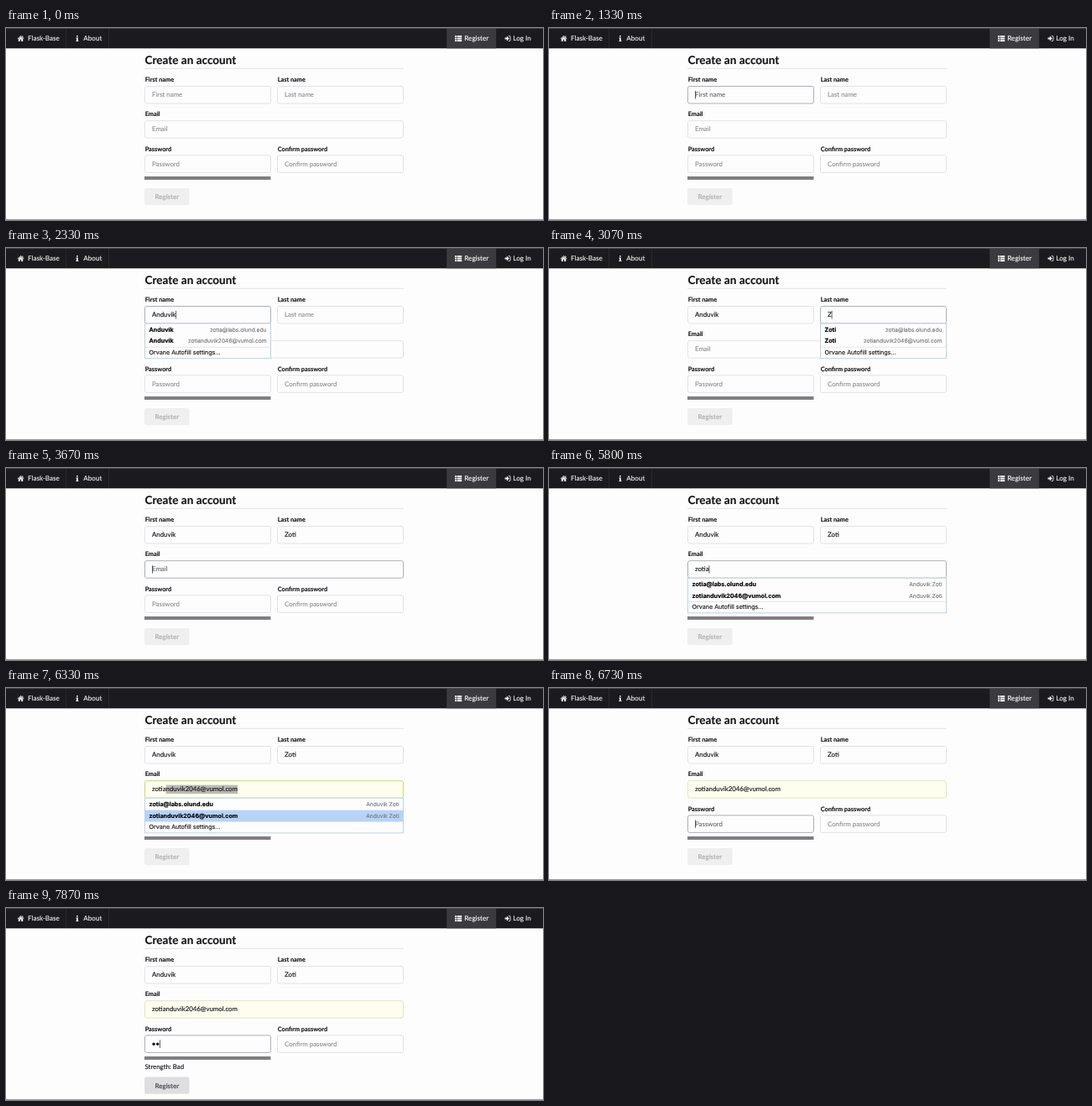
These frames come from a looping animation (640x229 px, 8 s). An HTML page:

```html
<!DOCTYPE html>
<html lang="en">
<head>
<meta charset="utf-8">
<title>Create an account</title>
<style>
  html, body { margin: 0; width: 100%; height: 100%; overflow: hidden; background: #fefdfe; }
  svg { display: block; width: 640px; height: 229px; text-rendering: geometricPrecision; }
  text { font-family: Lato, sans-serif; font-size: 7.85px; white-space: pre; stroke-width: .14; }
  .nav { font-size: 8.1px; }
  .title { font-size: 13.55px; font-weight: 700; }
  .label { font-size: 7.35px; font-weight: 700; }
  .bold { font-weight: 700; }
  .menu { font-family: Inter, sans-serif; font-size: 7.15px; }
  .hint { font-family: Inter, sans-serif; font-size: 6.65px; }
</style>
</head>
<body>
<svg id="stage" viewBox="0 0 640 229"></svg>
<script>
const LOOP = 8000;
const LEFT = 165.5, RIGHT = 323.5, HALF = 150, FULL = 308;
const FIRST = 'Anduvik', LAST = 'Zoti';
const MAILS = ['zotia@labs.olund.edu', 'zotianduvik2046@vumol.com'];
const INK = '#141416';

const stage = document.getElementById('stage');
const pen = document.createElement('canvas').getContext('2d');
pen.font = '78.5px Lato, sans-serif';
const widthOf = s => pen.measureText(s).width / 10;

// Latest value in a list of [time, value] steps.
const at = (steps, t) => steps.reduce((v, [from, next]) => t >= from ? next : v, undefined);
const within = (t, from, to) => t >= from && t < to;

const rect = (x, y, w, h, fill, more = '') =>
  `<rect x="${x}" y="${y}" width="${w}" height="${h}" fill="${fill}" ${more}/>`;
// The hairline stroke gives the slightly heavy look of smoothed screen text.
const text = (x, y, s, fill = INK, cls = '', anchor = 'start') =>
  `<text x="${x}" y="${y}" fill="${fill}" stroke="${fill}" class="${cls}" text-anchor="${anchor}">${s}</text>`;
const path = (d, fill, more = '') => `<path d="${d}" fill="${fill}" ${more}/>`;

const firstLength = [[0, 0], [1670, 1], [1800, 2], [2000, 3], [2130, 5], [2270, 6], [2330, 7]];
const lastLength = [[0, 0], [3000, 1], [3130, 2], [3270, 3], [3400, 4]];
const mailLength = [[0, 0], [5070, 1], [5200, 2], [5400, 3], [5530, 4], [5730, 5]];
const highlight = [[0, -1], [6000, 0], [6200, 1]];
const dotCount = [[0, 0], [7670, 1], [7870, 2]];
const accepted = 6470;

const fields = [
  { label: 'First name', x: LEFT, y: 69.5, w: HALF, focus: [1270, 2600],
    value: t => FIRST.slice(0, at(firstLength, t)) },
  { label: 'Last name', x: RIGHT, y: 69.5, w: HALF, focus: [2600, 3600],
    value: t => LAST.slice(0, at(lastLength, t)) },
  { label: 'Email', x: LEFT, y: 110.7, w: FULL, focus: [3600, 6670],
    value: t => at(highlight, t) < 0 ? MAILS[0].slice(0, at(mailLength, t)) : MAILS[at(highlight, t)],
    filled: t => at(highlight, t) >= 0 },
  { label: 'Password', x: LEFT, y: 151.9, w: HALF, focus: [6670, LOOP],
    dots: t => at(dotCount, t) },
  { label: 'Confirm password', x: RIGHT, y: 151.9, w: HALF, focus: [LOOP, LOOP] },
];

function drawNav() {
  const pale = '#f0f0f1', white = '#fff';
  const divider = x => rect(x, 0, 0.8, 24, '#2d2c30');
  const bullets = [9, 11.6, 14.2].map(y =>
    rect(535, y, 1.9, 1.9, white) + rect(537.6, y, 5.6, 1.9, white)).join('');
  return rect(0, 0, 640, 24.3, '#1b1a1e') + rect(525.2, 0, 59, 24.3, '#3b3a3e') +
    [71, 122].map(divider).join('') + rect(0, 0, 640, 0.8, '#504f53') +
    path('M13.5 12.7 17.5 9.1 19.3 10.7V9.5h1v2.1l1.2 1.1-.5.5-3.5-3.1-3.5 3.1zM14.8 13l2.7-2.4 2.7 2.4v2.9h-2v-2.1h-1.4v2.1h-2z', pale) +
    text(26, 15.2, 'Flask-Base', pale, 'nav') +
    path('M84 9h1.7v1.6H84zM83.4 11.4h2.4v3.6h.6v1h-3v-1h.6v-2.6h-.6z', pale) +
    text(92.3, 15.2, 'About', pale, 'nav') +
    bullets + text(546.3, 15.2, 'Register', white, 'nav') +
    path('M594.5 11.5h2.3V9.6l3 2.9-3 2.9v-1.9h-2.3z', pale) +
    path('M598.7 9.5h1.2q1.1 0 1.1 1.1v3.8q0 1.1-1.1 1.1h-1.2', 'none', `stroke="${pale}" stroke-width=".9"`) +
    text(604.3, 15.2, 'Log In', pale, 'nav');
}

function drawField(f, t) {
  const focused = within(t, ...f.focus);
  const filled = f.filled && f.filled(t);
  const value = f.value ? f.value(t) : '';
  const dots = f.dots ? f.dots(t) : 0;
  const [idle, active] = filled ? ['#e2e6c3', '#c9d973'] : ['#e2e1e4', '#a9b1b4'];
  const blend = focused ? Math.min(100, (t - f.focus[0]) / 0.8 + 40) : 0;
  const textX = f.x + 8.5, base = f.y + 12.6;

  let out = text(f.x + 0.2, f.y - 5.4, f.label, INK, 'label') +
    rect(f.x, f.y, f.w, 20.5, filled ? '#fdfeed' : '#fefdfe',
      `rx="2.2" stroke="color-mix(in srgb, ${active} ${blend}%, ${idle})"`);

  const selecting = filled && t < accepted;
  if (selecting) {
    const typed = widthOf(MAILS[0].slice(0, 5));
    out += rect(textX + typed, f.y + 5, widthOf(value) - typed, 10.5, '#b9bab4');
  }
  for (let i = 0; i < dots; i++)
    out += `<circle cx="${textX + 2.1 + 4.6 * i}" cy="${f.y + 10.4}" r="1.7" fill="${INK}"/>`;
  if (value) out += text(textX, base, value);
  else if (!dots) out += text(textX, base, f.label, focused ? '#6c6c6e' : '#8f8f91');

  const blinkOff = within(t, 4270, 4730) || within(t, 7270, 7670);
  if (focused && !selecting && !blinkOff)
    out += rect(textX + widthOf(value) + 4.6 * dots, f.y + 5.5, 0.7, 9.5, '#222');
  return out;
}

function drawMenu(f, rows, selected = -1) {
  const top = f.y + 20.5, right = f.x + f.w;
  let out = rect(f.x, top, f.w, 41.7, '#fefdfe', 'stroke="#b9d4e4"');
  rows.forEach(([name, hint], i) => {
    const y = top + 13.4 * i;
    if (i === selected) out += rect(f.x + 0.5, y + 1.1, f.w - 1, 13.4, '#b6d3f9');
    out += text(f.x + 5, y + 10, name, '#000', 'menu bold') +
      text(right - 5, y + 10, hint, '#79797b', 'hint', 'end');
  });
  return out + rect(f.x + 0.5, top + 27.8, f.w - 1, 0.7, '#dcdcde') +
    text(f.x + 5, top + 37.2, 'Orvane Autofill settings...', '#111', 'menu');
}

function drawButton(t) {
  const ready = t >= 7670;
  const y = ready ? 201.5 : 191;
  return rect(165, 177, 150.5, 4, '#7f7f81') +
    (ready ? text(LEFT, 191.5, 'Strength: Bad') : '') +
    rect(165, y, 53.5, 20.3, ready ? '#dedee0' : '#efeff0', 'rx="2.2"') +
    text(191.8, y + 13, 'Register', ready ? '#59595b' : '#b5b5b7', 'bold', 'middle');
}

function draw(t) {
  const [first, last, mail] = fields;
  let out = drawNav() +
    text(LEFT, 42.8, 'Create an account', INK, 'title') +
    rect(165, 47.8, 309, 0.8, '#d9d9db') +
    fields.map(f => drawField(f, t)).join('') + drawButton(t);
  if (within(t, 1730, 2600)) out += drawMenu(first, MAILS.map(m => [FIRST, m]));
  if (within(t, 3070, 3600)) out += drawMenu(last, MAILS.map(m => [LAST, m]));
  if (within(t, 5130, accepted))
    out += drawMenu(mail, MAILS.map(m => [m, `${FIRST} ${LAST}`]), at(highlight, t));
  return out + rect(0, 228, 640, 1, '#98989a');
}

const start = performance.now();
let shown = '';
function tick() {
  const picture = draw((performance.now() - start) % LOOP);
  if (picture !== shown) stage.innerHTML = shown = picture;
  requestAnimationFrame(tick);
}
tick();
</script>
</body>
</html>
```
